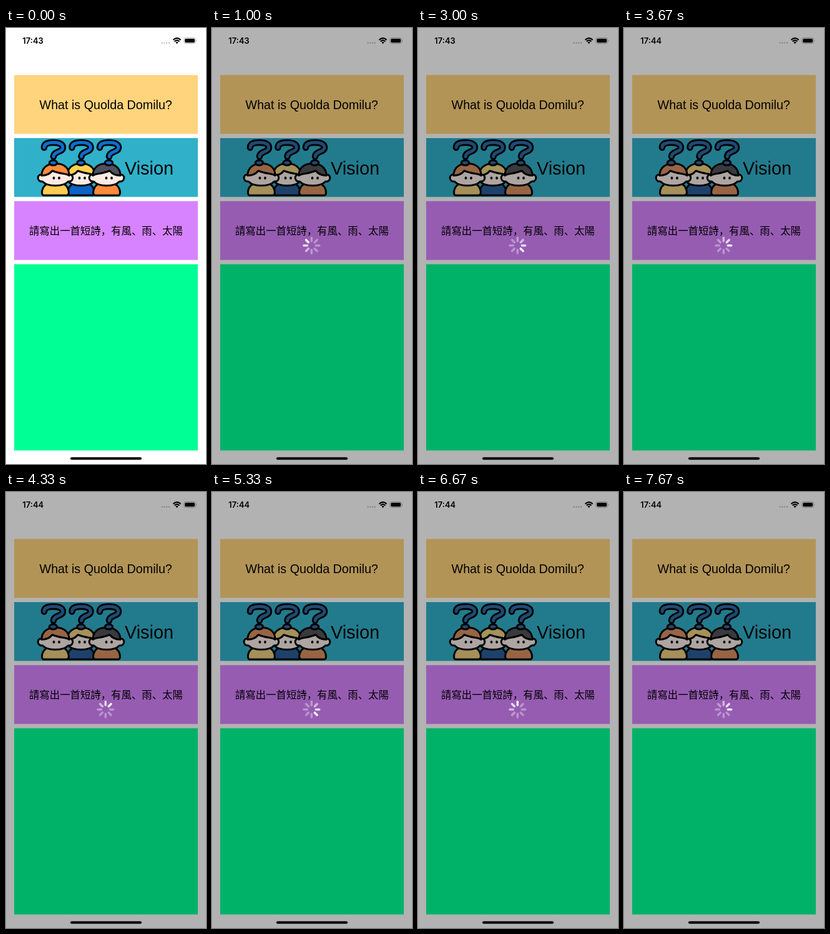
Recreate the animation shown at these times as an HTML page. Size 320 by 693 pixels, loop 8000 ms.

```html
<!DOCTYPE html>
<html lang="zh-Hans">
<head>
<meta charset="utf-8">
<title>Question screen</title>
<style>
  html, body { margin: 0; width: 100%; height: 100%; overflow: hidden; background: #fff; }
  svg { display: block; width: 100%; height: 100%; }
  .latin { font-family: "Liberation Sans", Arial, sans-serif; }
  .han { font: 16.4px "Noto Sans CJK SC", "Noto Sans CJK TC", "Noto Sans CJK", sans-serif; }
  #clock { font: 600 13px Inter, sans-serif; }
  .line { stroke: #000; stroke-width: 3; stroke-linejoin: round; stroke-linecap: round; }
  .muted { filter: saturate(.62); }
</style>
</head>
<body>
<svg viewBox="0 0 320 693">
  <defs>
    <path id="hook" d="M-14.5 190 C-14.5 184 -8 182 0.5 182 C10 182 15.5 185 15.5 190 C15.5 197.5 1 195.5 0.5 204.5" fill="none" stroke-linecap="round" stroke-linejoin="round"/>
    <g id="mark">
      <use href="#hook" stroke="#000" stroke-width="10.5"/>
      <use href="#hook" stroke="#0b6fd3" stroke-width="4.8"/>
      <ellipse class="line" cy="214.3" rx="6.2" ry="4" fill="#0b6fd3"/>
    </g>
  </defs>

  <rect width="320" height="693" fill="#fff"/>

  <text id="clock" x="26.2" y="25">17:43</text>
  <g fill="#bdbdbd">
    <circle cx="249.6" cy="23.6" r="1.2"/><circle cx="253.4" cy="23.6" r="1.2"/>
    <circle cx="257.2" cy="23.6" r="1.2"/><circle cx="261" cy="23.6" r="1.2"/>
  </g>
  <g fill="none" stroke="#000" stroke-width="2">
    <path d="M267.4 19 Q273.5 13.2 279.6 19"/>
    <path d="M269.6 21.4 Q273.5 17.8 277.4 21.4"/>
  </g>
  <path d="M271.3 22.8 Q273.5 21 275.7 22.8 L273.5 25.2 Z"/>
  <rect x="284.7" y="15.6" width="18.8" height="9" rx="2.8" fill="none" stroke="#a5a5a5" stroke-width=".9"/>
  <rect x="286.2" y="17" width="15.8" height="6.2" rx="1.6"/>
  <path d="M304.5 18.6 q1.6 1.5 0 3 z" fill="#a5a5a5"/>

  <rect x="13.1" y="74.7" width="293.8" height="93.6" fill="#ffd47d"/>
  <rect x="13.1" y="175" width="293.8" height="93.5" fill="#30b0c9"/>
  <rect x="13.1" y="275.2" width="293.8" height="93.5" fill="#d783ff"/>
  <rect x="13.1" y="375.5" width="293.8" height="296" fill="#00ff95"/>

  <text class="latin" x="159.7" y="129" font-size="19.7" text-anchor="middle">What is Quolda Domilu?</text>
  <text class="latin" x="190" y="232.6" font-size="28.8">Vision</text>
  <text class="han" x="37" y="328.4">請寫出一首短詩，有風、雨、太陽</text>

  <g id="kids"></g>

  <rect x="103" y="682.2" width="114" height="4.1" rx="2"/>

  <g id="busy">
    <rect width="320" height="693" fill-opacity=".3"/>
    <g id="spinner" transform="translate(159.3 345.7)" stroke="#fff" stroke-width="3.5" stroke-linecap="round"></g>
  </g>
</svg>
<script>
const NS = "http://www.w3.org/2000/svg";
const byId = id => document.getElementById(id);

// Each child is drawn around x = 0; the middle one stands behind the others.
function kid(x, flip, hair, shirt) {
  return `
  <g transform="translate(${x} 0)">
    <g transform="scale(${flip} 1)">
      <path class="line" fill="${shirt}" d="M-17 266 C-22 266 -21 258 -18 253 C-15 248 -10 247 -6 247 H10 C16 247 20 251 22 258 C23 263 22 266 19 266 Z"/>
      <path class="line" fill="#fdebe3" d="M-21 233 C-29 232 -29 245 -19.5 244 C-15 249 -8 250.5 1 250.5 C10 250.5 17 249 21.5 244 C31 245 31 232 23 233 C20 222 -18 222 -21 233 Z"/>
      <path class="line" fill="${hair}" d="M-21 234.5 C-21 222 -12 215.5 1 215.5 C15 215.5 23 222 23 234.5 C19 231 10 232.5 -4 227 C-8 232 -14 234.5 -21 234.5 Z"/>
    </g>
    <ellipse cx="-1.5" cy="238.5" rx="1.9" ry="2.3"/>
    <ellipse cx="7" cy="238.5" rx="1.9" ry="2.3"/>
  </g>`;
}

byId("kids").innerHTML =
  kid(119, 1, "#ffd050", "#0b63c4") +
  kid(78, 1, "#ff8a3c", "#ffcb52") +
  kid(162, -1, "#50515c", "#ff8a3c") +
  [75.5, 120, 164.5].map(x => `<use href="#mark" x="${x}"/>`).join("");

const LOOP = 8000, SPOKES = 8, BUSY_AT = 1000;
const FADE = [0.92, 0.78, 0.56, 0.38, 0.35, 0.35, 0.35, 0.35];

const spokes = Array.from({ length: SPOKES }, (_, i) => {
  const line = document.createElementNS(NS, "line");
  line.setAttribute("y1", -7);
  line.setAttribute("y2", -12.4);
  line.setAttribute("transform", `rotate(${i * 360 / SPOKES})`);
  byId("spinner").append(line);
  return line;
});

function draw(t) {
  // The picture advances three times a second.
  const tick = Math.floor((t + 3.4) * 0.003);
  const busy = t >= BUSY_AT;
  byId("busy").style.display = busy ? "" : "none";
  byId("kids").classList.toggle("muted", busy);
  byId("clock").textContent = tick < 10 ? "17:43" : "17:44";
  // The brightest spoke moves clockwise by one every 100 ms.
  const head = Math.floor(tick / 0.3 + 5.75);
  spokes.forEach((line, i) => {
    const lag = ((head - i) % SPOKES + SPOKES) % SPOKES;
    line.style.strokeOpacity = FADE[lag];
  });
}

function frame() {
  draw(performance.now() % LOOP);
  requestAnimationFrame(frame);
}
frame();
</script>
</body>
</html>
```
